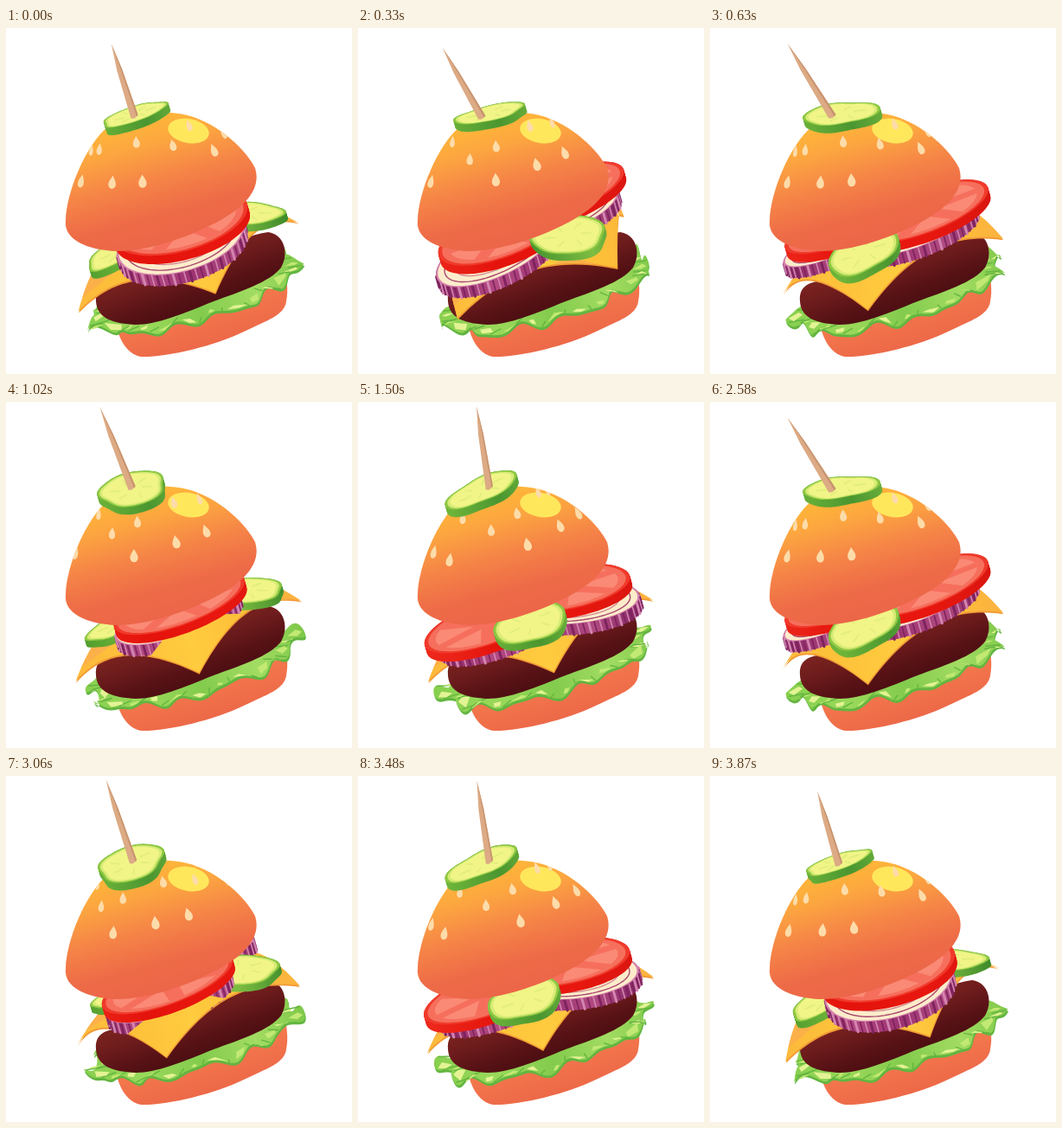
These frames come from a looping animation (400x400 px, 3.9 s). An HTML page with a canvas:

```html
<!DOCTYPE html>
<html lang="en">
<head>
<meta charset="utf-8">
<title>Spinning burger</title>
<style>
html, body { margin: 0; width: 100%; height: 100%; overflow: hidden; background: #fff; }
canvas { display: block; width: 400px; height: 400px; }
</style>
</head>
<body>
<canvas id="stage" width="400" height="400"></canvas>
<script>
const ctx = document.getElementById('stage').getContext('2d');
const { sin, cos, PI, abs, min, max, floor } = Math;
const DEG = PI / 180, STEP = 30, STEPS = 65;
const VIEW = 0.32; // vertical squash of a level circle
let spin = 0;

const blend = (x0, y0, x1, y1, ...colors) => {
  const g = ctx.createLinearGradient(x0, y0, x1, y1);
  colors.forEach((c, i) => g.addColorStop(i / (colors.length - 1), c));
  return g;
};

const paint = {
  dome: blend(162, 95, 204, 250, '#ffbb36', '#fca540', '#f58447', '#ee6b47', '#eb6549'),
  bun: blend(210, 300, 232, 376, '#f8824e', '#f1734b', '#ec6647'),
  patty: blend(195, 265, 220, 332, '#7c2420', '#6c1b1c', '#571215', '#490d11'),
  cheese: blend(-140, 0, 135, 0, '#fdb93c', '#fdc23a', '#ffcb3f', '#fdbf38', '#fbb040'),
  leaf: blend(-140, 0, 130, 0, '#86cf4e', '#9ad85a', '#83cb4d', '#a2dc62', '#7cc748'),
  rind: blend(-130, 0, 120, 0, '#4c9a2c', '#6fb53a', '#4a9630', '#7dbd42', '#3f8b2b'),
  onion: blend(-120, 0, 120, 0, '#8b2a66', '#b44a82', '#9c3371', '#b04a80', '#7f2460'),
  tomato: blend(-140, 0, 130, 0, '#ee2a1d', '#e4130c', '#e8170f', '#d91610')
};

function poly(points, fill) {
  ctx.beginPath();
  points.forEach(([x, y]) => ctx.lineTo(x, y));
  ctx.closePath();
  ctx.fillStyle = fill;
  ctx.fill();
}

function line(points, color, width) {
  ctx.beginPath();
  points.forEach(([x, y]) => ctx.lineTo(x, y));
  ctx.strokeStyle = color;
  ctx.lineWidth = width;
  ctx.stroke();
}

const sweep = (from, to, step, fn) => {
  const out = [];
  for (let d = from; d <= to; d += step) out.push(fn(d * DEG));
  return out;
};
const ring = fn => sweep(0, 356, 4, fn);

// A round slice: returns the projected point at body angle t and scale s.
const slice = ({ x, y, r, tilt = 0, high = 0, lump = 0, oval = 0, skew = 0 }) => (t, s = 1) => {
  const bumps = lump * (sin(3 * t + 1) + 0.6 * cos(5 * t)) + oval * cos(2 * t - 2.6);
  const q = r * s * (1 + bumps);
  const px = q * cos(t + spin);
  const lift = tilt * q * cos(t - high);
  return [x + px, y + VIEW * q * sin(t + spin) - lift - skew * px];
};

function slab(at, thick, side) {
  const rim = ring(t => at(t));
  for (let d = thick; d >= 0; d--) poly(rim.map(([x, y]) => [x, y + d]), side);
}

function pickle(spec, thick) {
  const at = slice(spec);
  slab(at, thick, paint.rind);
  poly(ring(t => at(t)), '#8fc843');
  poly(ring(t => at(t, 0.93)), '#d6eb75');
  poly(ring(t => at(t, 0.85)), '#f1f587');
  for (let i = 0; i < 6; i++) {
    const t = i * PI / 3;
    line([at(t, 0.35), at(t + 0.1, 0.62)], '#e3ee7c', 2);
  }
}

function tomato(spec) {
  const at = slice({ ...spec, r: 80 });
  slab(at, 10, paint.tomato);
  poly(ring(t => at(t)), '#f03a2b');
  poly(ring(t => at(t, 0.94)), '#f66f5d');
  for (let i = 0; i < 6; i++) {
    const a = i * 60;
    poly([...sweep(a + 8, a + 52, 11, t => at(t, 0.83)), at((a + 30) * DEG, 0.25)], '#fa8a75');
  }
}

function onion(spec) {
  const at = slice({ ...spec, r: 76 });
  slab(at, 13, paint.onion);
  for (let i = 0; i < 72; i++) {
    const t = i * 5 * DEG;
    if (sin(t + spin) < -0.1) continue;
    const [px, py] = at(t);
    line([[px, py], [px, py + 13]], i % 2 ? '#d384b0' : '#7f235f', i % 3 ? 1.6 : 3);
  }
  poly(ring(t => at(t)), '#d583ac');
  poly(ring(t => at(t, 0.97)), '#fdeccb');
  [0.86, 0.7, 0.54, 0.38, 0.22].forEach((s, i) => {
    const loop = ring(t => at(t, s));
    line([...loop, loop[0]], i % 2 ? '#d08a94' : '#a9486f', 1.4);
  });
}

// Square sheet whose corners hang down.
function cheeseAt(t, s = 1) {
  const e = ((t / DEG - 126 + 765) % 90) - 45;
  const reach = 1 / cos(e * DEG), q = 104 * reach ** 0.82, droop = (reach - 1) / 0.414;
  const x = q * s * cos(t + spin);
  return [-5 + x, 27 + 30 * droop * s + 0.28 * q * s * sin(t + spin) - 0.06 * x];
}

function cheese() {
  const rim = sweep(0, 357, 3, t => cheeseAt(t));
  poly(rim.map(([x, y]) => [x, y + 2]), '#f19a35');
  poly(rim, paint.cheese);
  for (let i = 0; i < 4; i++) {
    const c = 81 + i * 90;
    if (abs(cos(c * DEG + spin)) > 0.6)
      poly([...sweep(c + 6, c + 30, 4, t => cheeseAt(t)), cheeseAt((c + 14) * DEG, 0.7)], '#fcb04a');
  }
}

function cheeseFlap() {
  const show = min(1, max(0, (sin(261 * DEG + spin) - 0.6) * 4));
  if (!show) return;
  ctx.globalAlpha = show;
  poly([[-5, 27], ...sweep(219, 287, 2, t => cheeseAt(t))], paint.cheese);
  ctx.globalAlpha = 1;
}

function lettuceAt(t, s = 1) {
  const q = 125 * s * (1 + 0.045 * sin(7 * t) + 0.03 * sin(11 * t + 1));
  const wave = 3.5 * sin(13 * t) + 2.5 * sin(19 * t + 2);
  return [-7 + q * cos(t + spin), 85 + 0.28 * q * sin(t + spin) + wave * s];
}

function lettuce() {
  const rim = sweep(0, 358, 2, t => lettuceAt(t));
  poly(rim.map(([x, y]) => [x, y + 3]), '#62b540');
  poly(rim, paint.leaf);
  for (let i = 0; i < 26; i++) {
    const t = i * 360 / 26 * DEG;
    if (sin(t + spin) < -0.3) continue;
    const w = 0.035 + 0.03 * (i % 3);
    poly([lettuceAt(t, 0.85), lettuceAt(t - w, 0.94), lettuceAt(t, 0.98), lettuceAt(t + w, 0.93)],
      i % 2 ? '#e3f394' : '#c2e973');
    line([lettuceAt(t + 0.12, 0.86), lettuceAt(t + 0.15, 0.98)], '#64b540', 1.4);
  }
}

// Seeds: angle, radius, height; the pattern repeats three times around.
const SEEDS = [[39, 92, -83], [101, 93, -82], [126, 88, -84], [65, 65, -102], [103, 54, -115], [33.5, 62, -111]];

function seeds() {
  for (const [deg, r, h] of SEEDS) for (let i = 0; i < 3; i++) {
    const a = (deg + i * 120) * DEG + spin, upper = r < 80;
    if (sin(a) < (upper ? -0.35 : -0.15)) continue;
    const x = r * cos(a);
    ctx.save();
    ctx.translate(-11 + x, h + VIEW * r * sin(a));
    ctx.rotate(0.16 - x * 0.004);
    const k = upper ? 0.88 : 1;
    ctx.scale(k * (0.6 + 0.4 * max(0, sin(a))), k);
    ctx.beginPath();
    ctx.moveTo(0, -8);
    ctx.bezierCurveTo(2, -4, 5, -1, 4.6, 3);
    ctx.bezierCurveTo(4, 9, -4, 9, -4.6, 3);
    ctx.bezierCurveTo(-5, -1, -2, -4, 0, -8);
    ctx.fillStyle = '#fddcaa';
    ctx.fill();
    ctx.restore();
  }
}

function pick() {
  const a = 75 * DEG + spin;
  const bx = -19 + 5.5 * cos(a), by = -129 + 1.8 * sin(a);
  const tx = -26 + 25 * cos(a), ty = -223 + 8 * sin(a);
  const mid = s => [tx + (bx - tx) * s, ty + (by - ty) * s];
  const [mx, my] = mid(0.35);
  poly([[tx, ty], [mx + 3, my], [bx + 5, by - 1], [bx, by + 2], [bx - 4, by + 1], [mx - 3, my]], '#dcaa84');
  poly([[tx, ty], [mx + 3, my], [bx + 5, by - 1], [bx + 3, by + 1], [mx + 1.5, my]], '#c8946f');
}

const DOME = new Path2D('M69 222C70 190 92 135 118 114C140 97 185 94 210 101C248 111 279 143 288 162C296 187 274 207 250 221C215 241 165 258 128 258C95 257 66 245 69 222Z');
const BUN = new Path2D('M126 335C128 355 138 377 156 380C185 381 240 368 275 351C302 338 322 332 324 316C327 302 324 290 322 272Z');
const PATTY = new Path2D('M104 316C102 292 125 292 150 290C200 285 265 240 303 236C323 239 327 262 318 277C305 294 270 305 240 316C205 330 175 343 150 343C125 342 105 336 104 316Z');

// Slices: angle, orbit, outward tilt, sideways lean, height.
const ONIONS = [[90, 49, 0.17, 0, 24], [268, 40, 0, 0.14, 24]];
const TOMATOES = [[85, 38, 0.1, 0, 5], [262, 52, 0, 0.14, 12]];

// Places a pair of slices; the one at the back tucks up under the bun.
const pair = (rows, cx, paintSlice) => rows.map(([deg, orbit, tilt, lean, base]) => {
  const t = deg * DEG, x = orbit * cos(t + spin), depth = orbit * sin(t + spin);
  const y = base - lean * x + 0.8 * min(0, depth);
  return [depth, () => paintSlice({ x: cx + x, y, tilt, high: t + PI, skew: lean / 2 })];
});

const fillPath = (path, color) => { ctx.fillStyle = color; ctx.fill(path); };
const stack = items => items.sort((p, q) => p[0] - q[0]).forEach(item => item[1]());

function local(fn) {
  ctx.save();
  ctx.translate(200, 220);
  ctx.rotate(-16 * DEG);
  fn();
  ctx.restore();
}

function filling() {
  const pickles = [0, 181].map(deg => {
    const t = deg * DEG, a = t + spin;
    return [75 * sin(a), () => pickle({
      x: 75 * cos(a), y: 16 + 17 * sin(a), r: 43, tilt: 0.22, high: t + PI, lump: 0.05
    }, 8)];
  });
  const inFront = ([depth]) => depth > 38;
  stack([...pickles.filter(p => !inFront(p)), ...pair(ONIONS, -5, onion)]);
  cheeseFlap();
  stack(pair(TOMATOES, -3, tomato));
  stack(pickles.filter(inFront));
}

function draw(now) {
  spin = floor(now / STEP) % STEPS / STEPS * 2 * PI;
  ctx.fillStyle = '#fff';
  ctx.fillRect(0, 0, 400, 400);
  ctx.lineJoin = ctx.lineCap = 'round';

  fillPath(BUN, paint.bun);
  local(lettuce);
  fillPath(PATTY, paint.patty);
  local(() => { cheese(); filling(); });

  fillPath(DOME, paint.dome);
  ctx.save();
  ctx.clip(DOME);
  ctx.beginPath();
  ctx.ellipse(211, 119, 24, 14, 0.18, 0, 2 * PI);
  ctx.fillStyle = '#ffe75c';
  ctx.fill();
  local(seeds);
  ctx.restore();

  local(() => {
    const a = -80 * DEG + spin;
    pickle({
      x: -17.5 + 5 * cos(a), y: -130, r: 41.5, tilt: 0.13, high: 65 * DEG, lump: 0.045, oval: 0.08
    }, 9);
    pick();
  });
}

const start = performance.now();
function tick() {
  draw(performance.now() - start);
  requestAnimationFrame(tick);
}
tick();
</script>
</body>
</html>
```
